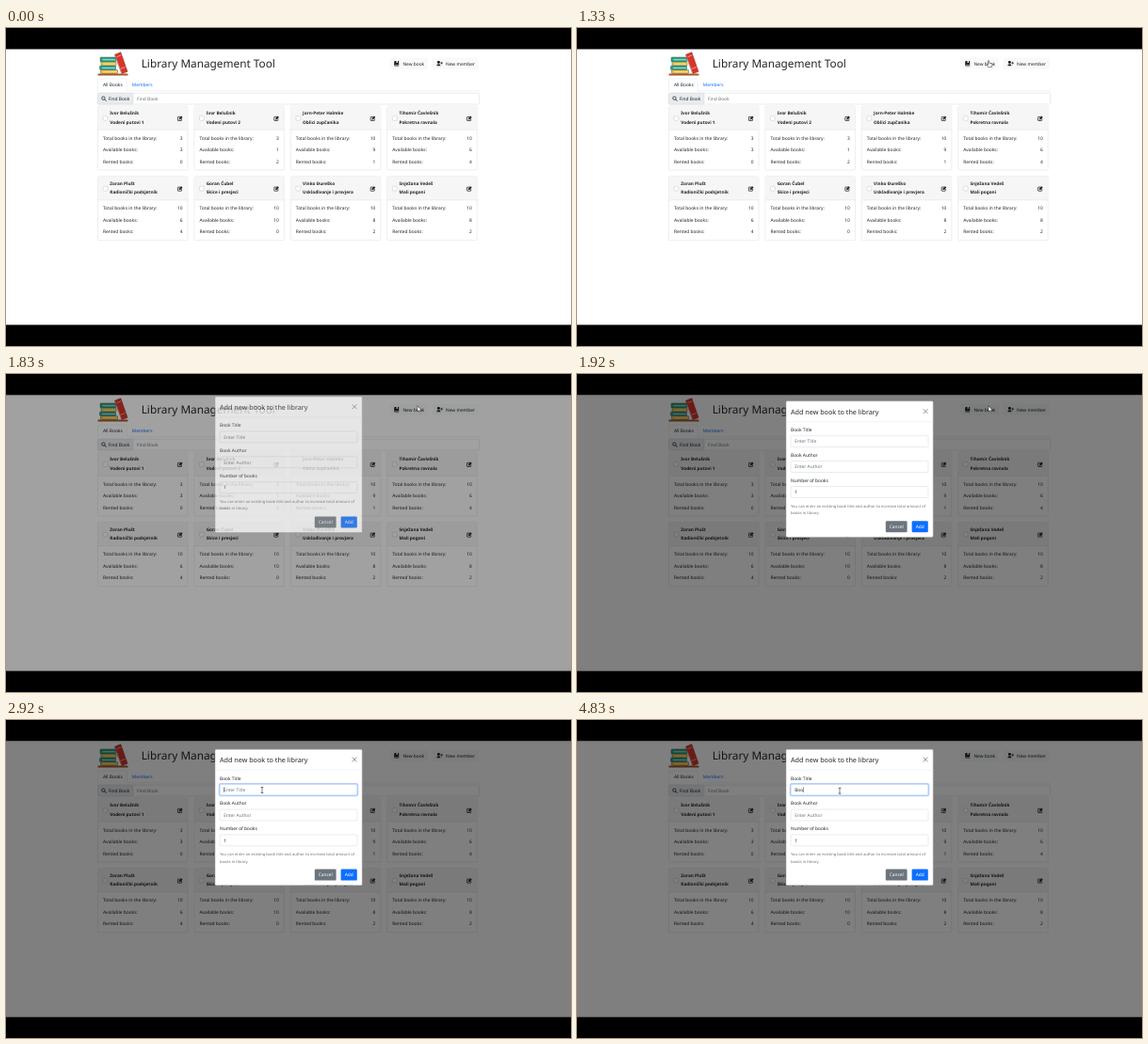
Recreate the animation shown at these times as an HTML page. Size 600 by 338 pixels, loop 5010 ms.

```html
<!DOCTYPE html>
<html lang="en">
<head>
<meta charset="utf-8">
<title>Library Management Tool</title>
<style>
  html, body { margin: 0; width: 100%; height: 100%; overflow: hidden; background: #000; }
  svg { display: block; width: 100%; height: 100%; }
  text {
    font-family: "Noto Sans", "Open Sans", sans-serif;
    font-size: 4.85px; fill: #212529; text-rendering: geometricPrecision; white-space: pre;
  }
  .title { font-size: 11.8px; font-weight: 500; }
  .heading { font-size: 7.2px; font-weight: 500; }
  .bold { font-size: 4.7px; font-weight: 700; }
  .hint { fill: #6c757d; }
  .small { font-size: 4.1px; fill: #6c757d; }
  .link { fill: #0d6efd; }
  .light { fill: #fff; }
  .end { text-anchor: end; }
  .mid { text-anchor: middle; }
</style>
</head>
<body>
<svg id="stage" viewBox="0 0 600 338" preserveAspectRatio="none"></svg>
<script>
const LOOP = 5010, TICK = 250 / 3;
const LINE = '#ced4da', EDGE = '#d9d9d9', INK = '#212529';

const text = (x, y, s, cls = '') => `<text x="${x}" y="${y}" class="${cls}">${s}</text>`;
const rect = (x, y, w, h, fill, stroke = 'none', r = 0, extra = '') =>
  `<rect x="${x}" y="${y}" width="${w}" height="${h}" rx="${r}" fill="${fill}" stroke="${stroke}" stroke-width=".45" ${extra}/>`;
const path = (d, fill = INK, stroke = 'none', width = .5) =>
  `<path d="${d}" fill="${fill}" stroke="${stroke}" stroke-width="${width}" stroke-linejoin="round" stroke-linecap="round"/>`;
const at = (x, y, body) => `<g transform="translate(${x} ${y})">${body}</g>`;

const books = [
  ['Ivor Belušnik', 'Vodeni putovi 1', 3, 3, 0],
  ['Ivor Belušnik', 'Vodeni putovi 2', 3, 1, 2],
  ['Jorn-Peter Halmke', 'Oblici zupčanika', 10, 9, 1],
  ['Tihomir Čavlešnik', 'Pokretna ravnala', 10, 6, 4],
  ['Zoran Plušt', 'Radionički podsjetnik', 10, 6, 4],
  ['Goran Čubel', 'Skice i presjeci', 10, 10, 0],
  ['Vinko Đureško', 'Usklađivanje i provjera', 10, 8, 2],
  ['Snježana Vedeš', 'Mali pogoni', 10, 8, 2]
];
const labels = ['Total books in the library:', 'Available books:', 'Rented books:'];

const editIcon = path('M3.2 1H.6Q.2 1 .2 1.4V4.7Q.2 5.1 .6 5.1H3.9Q4.3 5.1 4.3 4.7V3.4', 'none', INK, .75)
  + path('M1.7 2.5L4 .2L5.3 1.5L3 3.8L1.5 4Z');

function card([author, name, ...counts], i) {
  const rows = counts.map((n, k) => {
    const y = 35.8 + 12.5 * k;
    return text(5.5, y, labels[k]) + text(90, y, n, 'end');
  }).join('');
  return at(97.5 + 102.4 * (i % 4), 83 + 74.7 * (i >> 2),
    rect(0, 0, 95.5, 68, '#fff', EDGE, 1.2)
    + rect(.2, .2, 95.1, 25, '#f6f6f6', 'none', 1.1)
    + path('M0 25.2H95.5', 'none', EDGE, .45)
    + rect(5.6, 10.6, 4.8, 4.8, '#fff', '#bfbfbf', 1.2)
    + text(12.8, 9, author, 'bold') + text(12.8, 18.5, name, 'bold')
    + at(84.7, 10.4, editIcon) + rows);
}

const bookPile = [
  [100, 31, 16.5, 5, '#27a58c'], [101, 36, 16, 4.2, '#e3c64a'],
  [99.5, 40.2, 17, 4.2, '#1f9f96'], [100.5, 44.4, 18, 4.1, '#e8b93c']
].map(([x, y, w, h, c]) => rect(x, y, w, h, c, '#31584f', .7)
    + path(`M${x + 3} ${y + h * .55}H${x + w - 1}`, 'none', '#f1ead0', .8)).join('')
  + path('M115.7 28.2L121.8 25.7L129 46.3L123.2 48.6Z', '#d8352b', '#8e211c')
  + path('M118 30.6L121.8 29M122.2 43.2L126.4 41.6', 'none', '#f3b5a0', .8)
  + rect(97.5, 48.4, 32, 2.2, '#a55a2c', 'none', .6);

const bookIcon = path('M1 0H5V5.4H1Q0 5.4 0 4.4V1Q0 0 1 0Z')
  + path('M1 4.5H4.6', 'none', '#fff', .5) + path('M2.4 0V2.3L3.1 1.7L3.8 2.3V0Z', '#fff');
const userIcon = '<circle cx="2.1" cy="1.4" r="1.4"/>'
  + path('M0 5.2Q0 3.2 2.1 3.2T4.2 5.2Z') + path('M5.3 1.2V3.2M4.3 2.2H6.3', 'none', INK, .7);

const page = rect(0, 22.5, 600, 293, '#fff')
  + bookPile + text(143.7, 42, 'Library Management Tool', 'title')
  + rect(407.5, 31.8, 40.5, 12, '#f8f9fa', 'none', 1.2) + at(412.2, 35, bookIcon) + text(421.4, 39.7, 'New book')
  + rect(452.5, 31.8, 49.5, 12, '#f8f9fa', 'none', 1.2) + at(457.3, 35, userIcon) + text(467, 39.7, 'New member')
  + path('M97.5 66.8V55.2Q97.5 54 98.7 54H127Q128.2 54 128.2 55.2V66.8H502.5', 'none', '#dee2e6', .45)
  + text(103, 62, 'All Books') + text(133.8, 62, 'Members', 'link')
  + rect(97.5, 69.2, 405, 11.8, '#fff', LINE, 1.2)
  + rect(97.5, 69.2, 37.5, 11.8, '#e9ecef', LINE, 1.2)
  + '<circle cx="103.4" cy="74.6" r="1.7" fill="none" stroke="#212529" stroke-width=".8"/>'
  + path('M104.8 76L106.2 77.4', 'none', INK, .9)
  + text(108.8, 77, 'Find Book') + text(139, 77, 'Find Book', 'hint')
  + books.map(card).join('');

const field = (y, label, inner) => text(227, y - 10.6, label)
  + rect(227, y - 6, 146, 11.9, '#fff', LINE, 1.2) + inner;

const modal = rect(222, 31.2, 156.2, 144.6, '#fff', '#999', 1.4)
  + text(227, 45, 'Add new book to the library', 'heading')
  + path('M367.9 39.8L372.3 44.2M372.3 39.8L367.9 44.2', 'none', '#777', .75)
  + path('M222 53.1H378.2', 'none', '#dee2e6', .4)
  + field(74.1, 'Book Title', '')
  + rect(226.4, 67.5, 147.2, 13.1, 'none', '#b6d4fe', 1.6, 'id="glow" style="stroke-width:1.25"')
  + rect(227, 68.1, 146, 11.9, 'none', '#86b7fe', 1.2, 'id="ring"')
  + text(231.2, 75.8, 'Enter Title', 'hint').replace('<text', '<text id="prompt"')
  + text(231.2, 75.8, '').replace('<text', '<text id="typed"')
  + rect(0, 71.2, .4, 5.8, '#111', 'none', 0, 'id="caret"')
  + field(101, 'Book Author', text(231.2, 102.7, 'Enter Author', 'hint'))
  + field(127.9, 'Number of books', text(231.2, 129.6, '1'))
  + text(227, 144.1, 'You can enter an existing book title and author to increase total amount of', 'small')
  + text(227, 151.6, 'books in library.', 'small')
  + rect(327.8, 158.6, 22.8, 12, '#6c757d', 'none', 1.2) + text(339.2, 166.3, 'Cancel', 'light mid')
  + rect(355.6, 158.6, 17.2, 12, '#0d6efd', 'none', 1.2) + text(364.2, 166.3, 'Add', 'light mid');

// Each cursor is drawn with its pointing spot at the group's origin.
const cursors = `<g id="arrow">${path('M0 0V5.8L1.4 4.6L2.3 6.7L3.2 6.3L2.4 4.3H4.2Z', '#fff', '#000', .4)}</g>`
  + `<g id="hand">${path('M-.6 .6Q0 -.2 .6 .6V3L3.2 3.5Q4 3.7 4 4.5L3.4 7.4H-.4L-2.2 4.7Q-1.8 4 -.6 4.9Z', '#fff', '#000', .45)}</g>`
  + `<g id="beam">${path('M-1 -2.9H1M0 -2.9V2.9M-1 2.9H1', 'none', '#000', .5)}</g>`;

const $ = id => document.getElementById(id);
$('stage').innerHTML = rect(0, 0, 600, 338, '#000') + page
  + rect(0, 22.5, 600, 293, '#000', 'none', 0, 'id="shade"')
  + `<g id="modal">${modal}</g><g id="cursor">${cursors}</g>`;

// time, x, y
const route = [
  [250, 522, 271], [750, 504.3, 83.2], [1330, 437, 34.2], [1920, 437, 34.2],
  [2250, 366, 53], [2750, 272, 74.5], [2920, 272, 74.5], [3250, 279, 75.2], [LOOP, 279, 75.2]
];
// time, text
const typing = [[0, ''], [4080, 'B'], [4670, 'Bo'], [4830, 'Boo']];
// time, caret visible
const blink = [[0, 0], [2750, 1], [3250, 0], [3750, 1], [4580, 0], [4670, 1]];

const OPEN = 1720, FOCUS = 2750;
const clamp = v => Math.max(0, Math.min(1, v));
const easeOut = p => 1 - (1 - p) ** 1.7;
const latest = (table, t) => table.filter(row => row[0] <= t).pop()[1];
const show = (id, on) => $(id).setAttribute('visibility', on ? 'inherit' : 'hidden');

function stepTime(ms) {
  const stamp = k => 10 * Math.round(k * TICK / 10);
  let k = Math.round(ms / TICK);
  if (stamp(k) > ms) k--;
  return stamp(k);
}

function cursorAt(t) {
  const i = Math.max(1, route.findIndex(p => p[0] >= t));
  const [a, b] = [route[i - 1], route[i]];
  const p = clamp((t - a[0]) / (b[0] - a[0]));
  return [a[1] + (b[1] - a[1]) * p, a[2] + (b[2] - a[2]) * p];
}

function draw(ms) {
  const t = stepTime(ms);
  const fade = clamp((t - OPEN) / 150), slide = easeOut(clamp((t - OPEN) / 300));
  $('shade').setAttribute('opacity', fade / 2);
  $('modal').setAttribute('opacity', fade);
  $('modal').setAttribute('transform', `translate(0 ${-15.6 * (1 - slide)})`);

  const word = latest(typing, t);
  $('typed').textContent = word;
  show('prompt', !word);
  show('ring', t >= FOCUS);
  show('glow', t >= FOCUS);
  show('caret', latest(blink, t));
  $('caret').setAttribute('x', 231.2 + (word ? $('typed').getComputedTextLength() : 0));

  const [x, y] = cursorAt(t);
  const kind = t > 1800 ? (y > 68 && x < 373 ? 'beam' : 'arrow') : (y < 44 ? 'hand' : 'arrow');
  $('cursor').setAttribute('transform', `translate(${x} ${y})`);
  for (const id of ['arrow', 'hand', 'beam']) show(id, t >= 250 && id === kind);
}

const start = performance.now();
function tick() {
  draw((performance.now() - start) % LOOP);
  requestAnimationFrame(tick);
}
tick();
</script>
</body>
</html>
```
